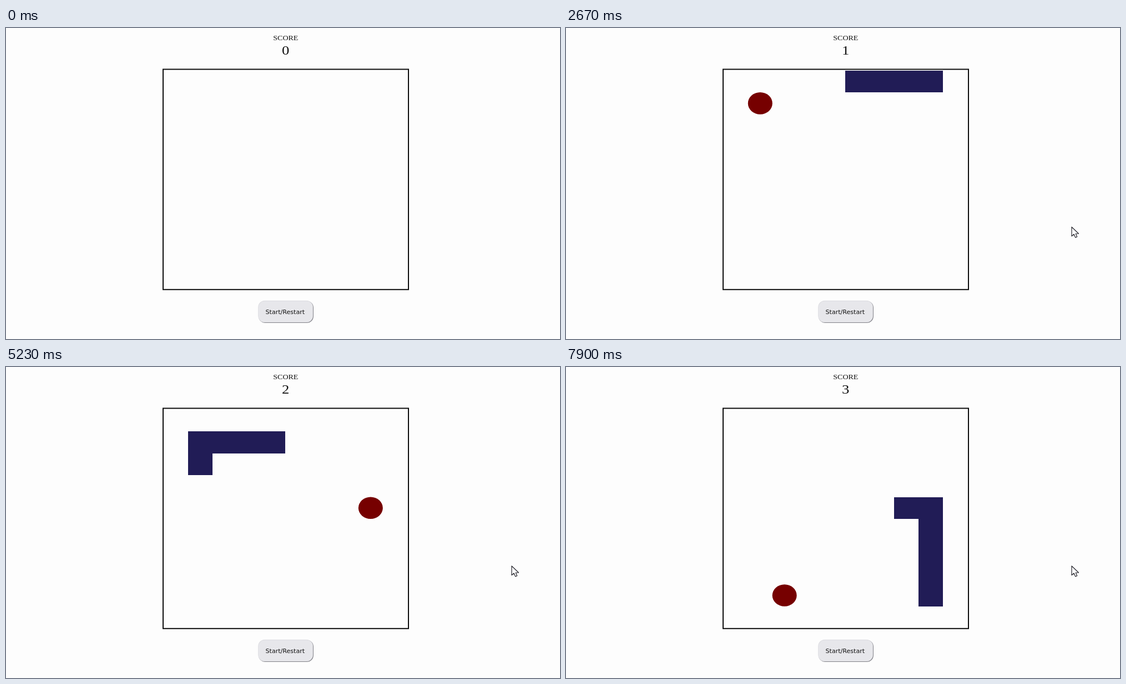
Animation of 998 by 561 pixels, one loop 8000 ms. Source, as an HTML page:

```html
<!DOCTYPE html>
<html lang="en">
<head>
<meta charset="utf-8">
<title>Snake</title>
<style>
  html, body { margin: 0; width: 100%; height: 100%; overflow: hidden; background: #fdfdfd; }
  svg { display: block; width: 998px; height: 561px; }
  text { text-anchor: middle; fill: #111; }
  .serif { font-family: "Liberation Serif", serif; }
  .sans { font-family: "DejaVu Sans", sans-serif; }
</style>
</head>
<body>
<svg viewBox="0 0 998 561">
  <rect x="283" y="74.5" width="442" height="397.3" fill="none" stroke="#0c0c0c" stroke-width="2"/>
  <path id="snake" fill="#211c56" shape-rendering="crispEdges"/>
  <ellipse id="apple" rx="22" ry="19.8" fill="#760000"/>

  <rect x="455" y="492.5" width="99" height="39.5" rx="12" fill="#85858c"/>
  <rect x="454.2" y="491.8" width="98.8" height="39.2" rx="12" fill="#d9d9de"/>
  <rect id="face" x="455" y="492.8" width="97.6" height="37.8" rx="11"/>

  <!-- the page is shown with slightly wide pixels -->
  <g transform="scale(1.11 1)">
    <text class="serif" x="453.9" y="21.8" font-size="12.6">SCORE</text>
    <text class="serif" id="score" x="453.7" y="48.3" font-size="24">0</text>
    <text class="sans" x="453" y="516" font-size="10">Start/Restart</text>
  </g>

  <path id="cursor" d="M0 0V16.5L4 13L6.7 19L9.6 17.6L7.2 12H12.5Z" fill="#fff" stroke="#26262e" stroke-width="1.2" stroke-linejoin="round"/>
</svg>
<script>
const LOOP = 8000, START = 1063, FIRST_DELAY = 262, SPEED_UP = 0.9;
const CELL_W = 43.86, CELL_H = 39.45, LEFT = 284, TOP = 76.7;
const MOVES = "RRRRRRDDLLULLLLLDDDRRRRRRRDDDD";
const STEP = { R: [1, 0], L: [-1, 0], U: [0, -1], D: [0, 1] };
const APPLES = [[8, 0], [1, 1], [8, 4], [2, 8]];

// Cursor stops: time, x, y
const STOPS = [
  [350, 700, 562], [850, 510, 497], [1250, 510, 497], [1750, 824, 380],
  [2050, 824, 380], [2450, 911, 359], [LOOP, 911, 359]
];

const el = id => document.getElementById(id);
const snake = el("snake"), apple = el("apple"), score = el("score"),
      face = el("face"), cursor = el("cursor");
const px = col => LEFT + col * CELL_W;
const py = row => TOP + row * CELL_H;

// Play the game once; each apple shortens the delay between steps.
const trail = [[0, 0], [1, 0], [2, 0]];
const states = [{ time: START, points: 0, body: trail.slice() }];
let time = START, delay = FIRST_DELAY, points = 0;
for (const move of MOVES) {
  const [x, y] = trail.at(-1), [dx, dy] = STEP[move];
  const head = [x + dx, y + dy];
  trail.push(head);
  time += delay;
  if (String(head) === String(APPLES[points])) {
    points++;
    delay *= SPEED_UP;
  }
  states.push({ time, points, body: trail.slice(-3 - points) });
}

function drawGame(t) {
  const state = states.findLast(s => s.time <= t);
  apple.style.display = state ? "" : "none";
  score.textContent = state ? state.points : 0;
  snake.setAttribute("d", state ? state.body.map(([c, r]) =>
    `M${px(c)} ${py(r)}H${px(c + 1)}V${py(r + 1)}H${px(c)}Z`).join("") : "");
  if (state) {
    const [c, r] = APPLES[state.points];
    apple.setAttribute("cx", px(c + 0.5));
    apple.setAttribute("cy", py(r + 0.5));
  }
}

function drawCursor(t) {
  const next = STOPS.findIndex(s => s[0] > t);
  cursor.style.display = next > 0 ? "" : "none";
  let hover = false;
  if (next > 0) {
    const [t0, x0, y0] = STOPS[next - 1], [t1, x1, y1] = STOPS[next];
    const u = (t - t0) / (t1 - t0), k = u * u * (3 - 2 * u);
    const x = x0 + (x1 - x0) * k, y = y0 + (y1 - y0) * k;
    cursor.setAttribute("transform", `translate(${x} ${y})`);
    hover = x > 454 && x < 554 && y > 492 && y < 532;
  }
  face.setAttribute("fill", hover ? "#d0d0d7" : "#e7e7eb");
}

const origin = performance.now();
function frame() {
  const t = (performance.now() - origin) % LOOP;
  drawGame(t);
  drawCursor(t);
  requestAnimationFrame(frame);
}
frame();
</script>
</body>
</html>
```
